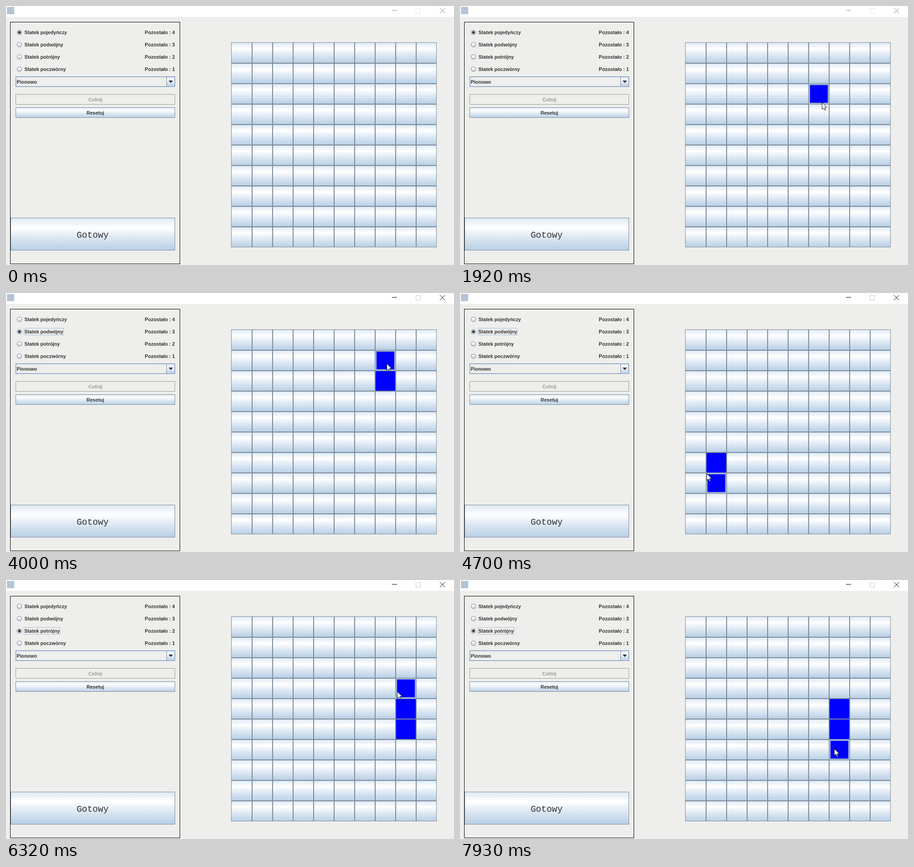
Write an HTML page with a canvas that moves like this. It is 983 by 570 pixels and loops after 8 s.

```html
<!DOCTYPE html>
<html lang="pl">
<head>
<meta charset="utf-8">
<title>Statki</title>
<style>
html, body { margin: 0; width: 100%; height: 100%; overflow: hidden; background: #eeeeec; }
canvas { display: block; }
</style>
</head>
<body>
<canvas id="stage" width="983" height="570"></canvas>
<script>
const ctx = document.getElementById('stage').getContext('2d');
const LOOP = 8000, TICK = 77, LEAD = 16;
const GRID = { x: 494, y: 80, pitch: 45.1, n: 10 };
const BACK = '#eeeeec', EDGE = '#7a8a99', GLOW = '#b8cfe5', SOFT = '#dde8f3', INK = '#333';
const SHIPS = ['pojedyńczy', 'podwójny', 'potrójny', 'poczwórny'];
const LABEL = 'bold 10.7px "Liberation Sans", Arial, sans-serif';

// Where the pointer turns or rests: tick, x, y
const STOPS = [
  [2, 655, 460], [3, 560, 418], [4, 560, 418], [15, 559, 180], [20, 650, 160],
  [25, 794, 212], [26, 866, 245], [31, 640, 346], [37, 114, 94], [38, 112, 86],
  [43, 112, 86], [48, 600, 150], [52, 835, 155], [59, 832, 405], [61, 541, 397],
  [69, 94, 104], [73, 94, 104], [82, 858, 245], [92, 557, 257], [99, 620, 440],
  [103, 821, 371]
];

function pointerAt(tick) {
  if (tick < STOPS[0][0]) return null;
  const i = Math.max(1, STOPS.findIndex(p => p[0] >= tick));
  const a = STOPS[i - 1], b = STOPS[i], k = (tick - a[0]) / (b[0] - a[0]);
  return [1, 2].map(j => Math.round(a[j] + (b[j] - a[j]) * k));
}

const edge = (start, i) => Math.ceil(start + GRID.pitch * i - .01);
const cellOf = (pos, start) => Math.floor((pos - start) / GRID.pitch);

function fill(x, y, w, h, color) {
  ctx.fillStyle = color;
  ctx.fillRect(x, y, w, h);
}

function frame(x, y, w, h, color) {
  ctx.strokeStyle = color;
  ctx.lineWidth = 1;
  ctx.strokeRect(x + .5, y + .5, w - 1, h - 1);
}

function text(str, x, y, align = 'left', color = INK, font = LABEL) {
  ctx.font = font;
  ctx.textAlign = align;
  ctx.fillStyle = color;
  ctx.fillText(str, x, y);
}

function sheen(y, h) {
  const g = ctx.createLinearGradient(0, y, 0, y + h);
  g.addColorStop(0, SOFT);
  g.addColorStop(.3, '#fff');
  g.addColorStop(.6, SOFT);
  g.addColorStop(1, GLOW);
  return g;
}

function button(x, y, w, h, hover, color) {
  fill(x, y, w, h, color || sheen(y, h));
  frame(x, y, w, h, hover ? GLOW : EDGE);
  if (hover) {
    frame(x + 1, y + 1, w - 2, h - 2, EDGE);
    frame(x + 2, y + 2, w - 4, h - 4, GLOW);
  }
}

function circle(x, y, r, color) {
  ctx.beginPath();
  ctx.arc(x, y, r, 0, Math.PI * 2);
  ctx.fillStyle = color;
  ctx.fill();
}

function line(x1, y1, x2, y2) {
  ctx.beginPath();
  ctx.moveTo(x1, y1);
  ctx.lineTo(x2, y2);
  ctx.stroke();
}

function titleBar(active) {
  fill(0, 0, 983, 24, '#fff');
  fill(2, 2, 16, 16, '#b4c4d6');
  frame(899, 5, 11, 11, active ? '#c8c8c8' : '#e6e6e6');
  ctx.strokeStyle = active ? '#000' : '#8c8c8c';
  ctx.lineWidth = 1;
  line(847, 9.5, 858, 9.5);
  line(952, 4.5, 963.5, 16);
  line(963.5, 4.5, 952, 16);
}

function radio(i, selected, focused, hover) {
  const y = 58 + 27 * i, name = 'Statek ' + SHIPS[i];
  circle(29.5, y, 5.6, EDGE);
  circle(29.5, y, 4.6, hover ? GLOW : sheen(y - 5, 10));
  if (hover) circle(29.5, y, 3.6, sheen(y - 5, 10));
  if (selected) circle(29.5, y, 3, INK);
  text(name, 40.5, y + 4);
  if (focused) frame(39, y - 8, Math.round(ctx.measureText(name).width) + 2, 16, '#a9bfd8');
  text('Pozostało : ' + (4 - i), 370.5, y + 4, 'right');
}

function comboBox() {
  fill(353, 156, 17, 21, sheen(156, 21));
  frame(21, 155, 350, 23, '#6d86ad');
  frame(22, 156, 348, 21, '#c9d7e8');
  fill(352, 156, 1, 21, '#6d86ad');
  ctx.beginPath();
  ctx.moveTo(356.5, 164);
  ctx.lineTo(366.5, 164);
  ctx.lineTo(361.5, 169.5);
  ctx.fillStyle = INK;
  ctx.fill();
  text('Pionowo', 23.5, 170.5);
}

function panel(choice, focus, pos) {
  const over = (x, y, w, h) => pos && pos[0] >= x && pos[0] < x + w && pos[1] >= y && pos[1] < y + h;
  frame(9, 35, 373, 533, '#000');
  SHIPS.forEach((_, i) => radio(i, i === choice, i === focus, over(24, 48 + 27 * i, 110, 22)));
  comboBox();
  frame(21, 194, 350, 23, '#999');
  text('Cofnij', 196, 210, 'center', '#999');
  button(21, 223, 350, 23, over(21, 223, 350, 23));
  text('Resetuj', 196, 239, 'center');
  button(10, 466, 361, 72);
  text('Gotowy', 190, 510, 'center', INK, '19.5px "Liberation Mono", "Courier New", monospace');
}

function board(size, pos) {
  const col = pos ? cellOf(pos[0], GRID.x) : -1;
  const row = pos ? cellOf(pos[1], GRID.y) : -1;
  // Ships hang upward from the pointer unless too near the top
  const first = row > size ? row - size + 1 : row;
  for (let r = 0; r < GRID.n; r++) {
    for (let c = 0; c < GRID.n; c++) {
      const x = edge(GRID.x, c), y = edge(GRID.y, r);
      const ship = c === col && row >= 0 && row < GRID.n && r >= first && r < first + size;
      button(x, y, edge(GRID.x, c + 1) - x, edge(GRID.y, r + 1) - y,
        ship && r === row, ship ? '#00f' : null);
    }
  }
}

function pointer(x, y) {
  const shape = [[0, 0], [0, 15], [3.4, 11.9], [5.8, 17.2], [8, 16.2], [5.7, 11.1], [10.4, 10.7]];
  ctx.beginPath();
  shape.forEach(([dx, dy]) => ctx.lineTo(x + .5 + dx, y + .5 + dy));
  ctx.closePath();
  ctx.fillStyle = '#fff';
  ctx.fill();
  ctx.strokeStyle = '#000';
  ctx.lineWidth = .9;
  ctx.stroke();
}

function draw(ms) {
  const tick = Math.floor((ms % LOOP + LEAD) / TICK);
  const pos = pointerAt(Math.min(tick, STOPS[STOPS.length - 1][0]));
  const choice = tick < 41 ? 0 : tick < 71 ? 1 : 2;
  const focus = tick < 40 ? -1 : tick < 70 ? 1 : 2;
  fill(0, 0, 983, 570, BACK);
  titleBar(tick >= 40);
  panel(choice, focus, pos);
  board(choice + 1, pos);
  if (pos) pointer(...pos);
}

const start = performance.now();
function loop() {
  draw(performance.now() - start);
  requestAnimationFrame(loop);
}
loop();
</script>
</body>
</html>
```
